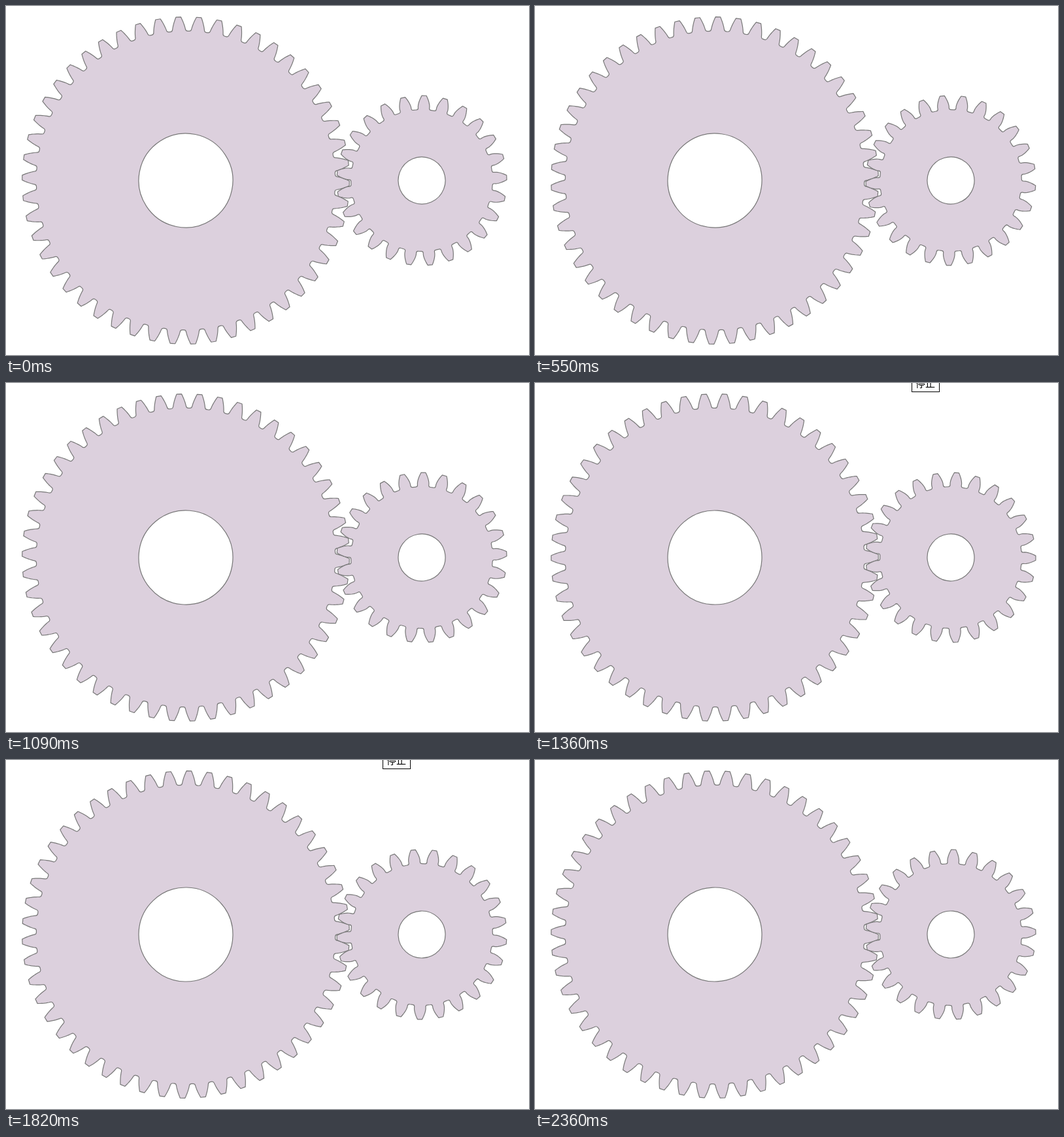
Write an HTML page that moves like this. It is 800 by 534 pixels and loops after 2450 ms.

```html
<!DOCTYPE html>
<html lang="zh">
<head>
<meta charset="utf-8">
<title>Gears</title>
<style>
html, body { margin: 0; width: 100%; height: 100%; overflow: hidden; background: #fff; }
svg { display: block; width: 800px; height: 534px; }
path { fill: #dcd0dd; fill-rule: evenodd; stroke: #777; stroke-width: 1.2; stroke-linejoin: round; }
rect { fill: #fff; stroke: #000; }
text { font: 15px "Noto Sans CJK SC", "Noto Sans CJK JP", "Noto Sans CJK", sans-serif; text-anchor: middle; }
</style>
</head>
<body>
<svg viewBox="0 0 800 534">
  <path id="wheel"/>
  <path id="pinion"/>
  <g id="button" visibility="hidden">
    <rect x="576.5" y="-12.5" width="42" height="26"/>
    <text x="597" y="6">停止</text>
  </g>
</svg>
<script>
const LOOP = 2450, STEPS = 27;
const MODULE = 361 * 2 / 75, PRESSURE = Math.PI / 9;
const inv = a => Math.tan(a) - a;
const $ = id => document.getElementById(id);

// Involute gear around the origin, one tooth pointing along +x
function gearPath(teeth, hole) {
  const pitch = MODULE * teeth / 2;
  const base = pitch * Math.cos(PRESSURE);
  const tip = pitch + MODULE;
  const root = pitch - 1.25 * MODULE;
  const fillet = 0.3 * MODULE;
  const half = r => Math.PI / 2 / teeth + inv(PRESSURE) - inv(Math.acos(Math.min(1, base / r)));
  const pt = (r, a) => (r * Math.cos(a)).toFixed(2) + ' ' + (r * Math.sin(a)).toFixed(2);
  const low = root + fillet, n = 8;
  let d = '';
  for (let i = 0; i < teeth; i++) {
    const c = i * 2 * Math.PI / teeth;
    const foot = half(root), end = foot + fillet / root;
    d += (i ? 'L' : 'M') + pt(root, c - end) + 'Q' + pt(root, c - foot) + ' ' + pt(low, c - half(low));
    for (let side = -1; side <= 1; side += 2) {
      for (let j = 0; j <= n; j++) {
        const r = low + (tip - low) * (side < 0 ? j : n - j) / n;
        d += 'L' + pt(r, c + side * half(r));
      }
    }
    d += 'Q' + pt(root, c + foot) + ' ' + pt(root, c + end);
  }
  const arc = x => `A${hole} ${hole} 0 0 1 ${x} 0`;
  return d + `ZM${hole} 0` + arc(-hole) + arc(hole) + 'Z';
}

// [step, teeth passed]: the speed drifts a little
const keys = [[0, 0], [6, .485], [12, .965], [15, 1.165], [20, 1.485], [22, 1.64], [26, 2.02]];
const MESH = 1.64; // a pinion tooth lies on the line of centres

function travel(k) {
  const i = Math.max(1, keys.findIndex(key => key[0] >= k));
  const [k0, p0] = keys[i - 1], [k1, p1] = keys[i];
  return p0 + (p1 - p0) * (k - k0) / (k1 - k0);
}

function place(id, x, angle) {
  $(id).setAttribute('transform', `translate(${x} 267) rotate(${angle})`);
}

function draw(now) {
  const k = Math.min(STEPS - 1, Math.floor((now % LOOP + 1.5) / LOOP * STEPS));
  const p = travel(k) - MESH;
  place('wheel', 275, -90 - p * 360 / 50);
  place('pinion', 636, 180 + p * 360 / 25);
  $('button').setAttribute('visibility', k >= 14 && k < 26 ? 'visible' : 'hidden');
  requestAnimationFrame(draw);
}

$('wheel').setAttribute('d', gearPath(50, 72));
$('pinion').setAttribute('d', gearPath(25, 36));
draw(performance.now());
</script>
</body>
</html>
```
